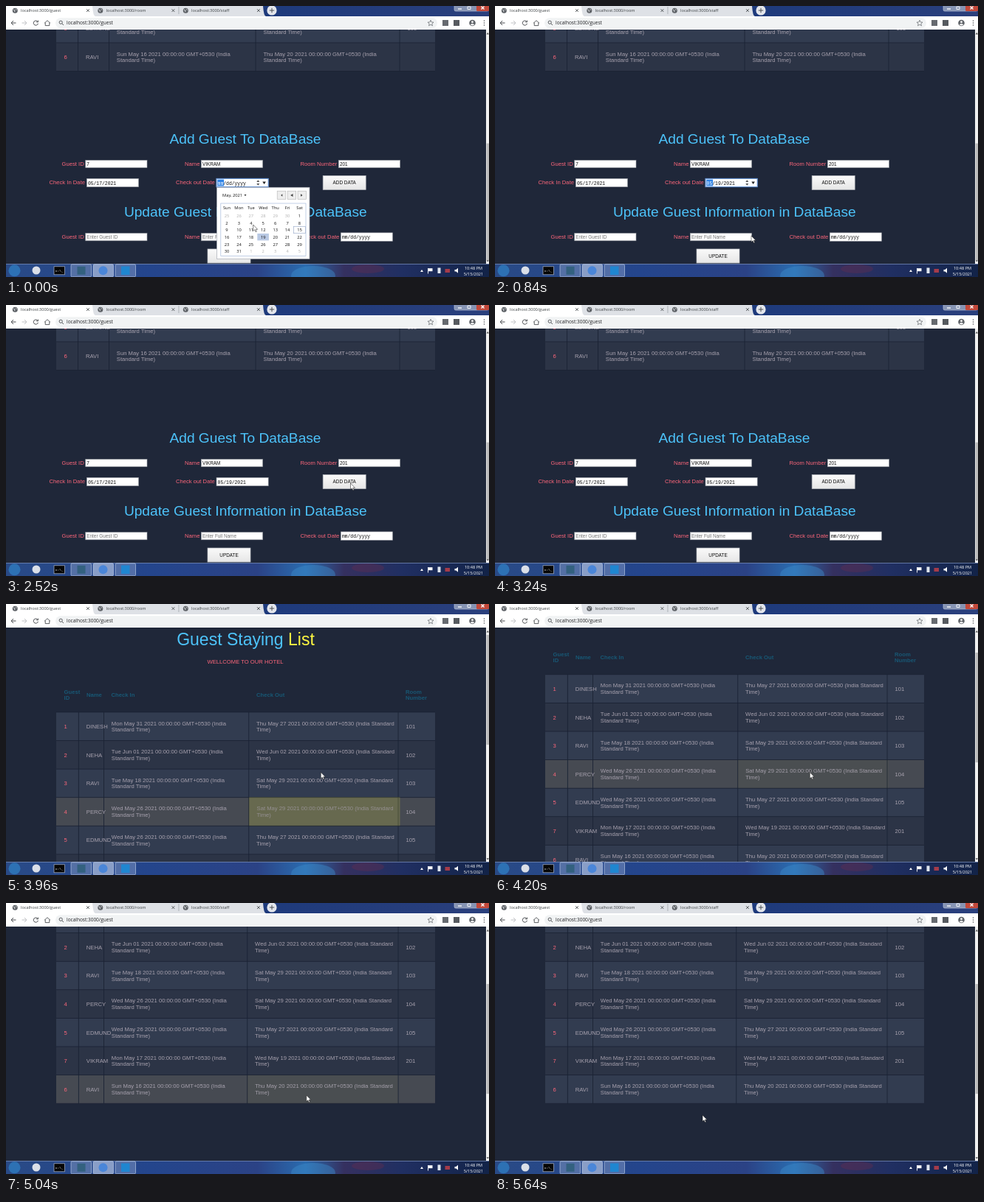
An HTML page for the animation above (5760 ms loop, 654 by 368 pixels).

```html
<!DOCTYPE html>
<html lang="en">
<head>
<meta charset="utf-8">
<title>Guest list</title>
<style>
html, body { margin: 0; width: 100%; height: 100%; overflow: hidden; background: #1f2739; }
svg { display: block; width: 654px; height: 368px; }
text { font-family: "Liberation Sans", Arial, sans-serif; white-space: pre; }
.ui { font-family: "Open Sans", "Noto Sans", sans-serif; }
.mono { font-family: "Liberation Mono", "Noto Sans Mono", monospace; }
</style>
</head>
<body>
<svg id="stage" viewBox="0 0 654 368">
  <defs>
    <clipPath id="view"><rect y="32" width="650" height="318"/></clipPath>
    <linearGradient id="bar">
      <stop offset="0" stop-color="#294a86"/><stop offset=".3" stop-color="#24458c"/>
      <stop offset=".52" stop-color="#2b4285"/><stop offset=".62" stop-color="#2a6cb0"/>
      <stop offset=".7" stop-color="#35305f"/><stop offset=".82" stop-color="#202f62"/>
      <stop offset="1" stop-color="#122348"/>
    </linearGradient>
    <linearGradient id="glass">
      <stop offset="0" stop-color="#2c4f95"/><stop offset=".5" stop-color="#1d3a7c"/>
      <stop offset="1" stop-color="#2a3f7c"/>
    </linearGradient>
    <linearGradient id="btn" x2="0" y2="1">
      <stop offset="0" stop-color="#fafafa"/><stop offset="1" stop-color="#e6e6e6"/>
    </linearGradient>
  </defs>
</svg>
<script>
const LOOP = 5760, STEP = 120, ROW = 38.6, TOP = 147, FORM_SCROLL = 290;
const BODY = 7.66, SMALL = 6.38;
const PINK = '#fb667a', SKY = '#4dc3fa', GREY = '#a7a1ae';
const stage = document.getElementById('stage');

function el(parent, tag, attrs = {}) {
  const node = document.createElementNS('http://www.w3.org/2000/svg', tag);
  for (const key in attrs) node.setAttribute(key, attrs[key]);
  parent.append(node);
  return node;
}
const group = (p, attrs) => el(p, 'g', attrs);
const rect = (p, x, y, width, height, fill, more) => el(p, 'rect', { x, y, width, height, fill, ...more });
const circle = (p, cx, cy, r, fill, more) => el(p, 'circle', { cx, cy, r, fill, ...more });
const line = (p, d, stroke, width = 0.8, more) =>
  el(p, 'path', { d, stroke, fill: 'none', 'stroke-width': width, ...more });
const shape = (p, d, fill, more) => el(p, 'path', { d, fill, ...more });
// cy is the middle of the capitals
function text(p, x, cy, str, size, fill, more) {
  const node = el(p, 'text', { x, y: cy + size * 0.36, 'font-size': size, fill, ...more });
  node.textContent = str;
  return node;
}
const MID = { 'text-anchor': 'middle' };
const UI = { class: 'ui' };
const UI_MID = { ...UI, ...MID };
const show = (node, on) => node.setAttribute('visibility', on ? 'inherit' : 'hidden');
const move = (node, x, y) => node.setAttribute('transform', `translate(${x} ${y})`);

const guests = [
  ['1', 'DINESH', 'Mon May 31', 'Thu May 27', '101'],
  ['2', 'NEHA', 'Tue Jun 01', 'Wed Jun 02', '102'],
  ['3', 'RAVI', 'Tue May 18', 'Sat May 29', '103'],
  ['4', 'PERCY', 'Wed May 26', 'Sat May 29', '104'],
  ['5', 'EDMUND', 'Wed May 26', 'Thu May 27', '105'],
  ['7', 'VIKRAM', 'Mon May 17', 'Wed May 19', '201'],
  ['6', 'RAVI', 'Sun May 16', 'Thu May 20', ''],
];
const stamp = day => day + ' 2021 00:00:00 GMT+0530 (India';
const rowFill = i => i % 2 ? '#2c3446' : '#323c50';

function twoLines(p, x, cy, lines) {
  return lines.map((s, i) => text(p, x, cy - 4.5 + i * 8.7, s, BODY, GREY));
}

function table(p, list, cols, wideOut) {
  const [c0, c1, c2, c3, c4, end] = cols;
  const height = list.length * ROW;
  const top = i => TOP + i * ROW;
  const backs = list.map((_, i) => rect(p, c0, top(i), end - c0, ROW, rowFill(i)));
  for (let i = 0; i <= list.length; i++) rect(p, c0, top(i) - 0.5, end - c0, 0.8, '#1a2132');
  for (const x of [c1, c2, c4]) rect(p, x - 0.4, TOP, 0.9, height, '#1b2335');
  const outs = group(p);
  rect(outs, c3 - 0.4, TOP, 0.9, height, '#1b2335');
  const cells = list.map((guest, i) => {
    const [id, name, from, to, room] = guest, cy = top(i) + ROW / 2;
    text(p, c0 + 10.5, cy, id, BODY, PINK);
    text(p, c1 + 10.5, cy, name, BODY, GREY);
    twoLines(p, c2 + 10.3, cy, [stamp(from), 'Standard Time)']);
    text(p, c4 + 10.4, cy, room, BODY, GREY);
    const cell = group(outs);
    const shadow = shape(cell, '', '#7f7c21', { opacity: 0 });
    const fill = rect(cell, c3, top(i), end - 50 - c3, ROW, '#fff842', { opacity: 0 });
    const lines = twoLines(cell, c3 + 10.4, cy, wideOut
      ? [stamp(to) + ' Standard', 'Time)'] : [stamp(to), 'Standard Time)']);
    return { cell, shadow, fill, lines, x: c3, right: end - 50, y: top(i) };
  });
  return { backs, cells, outs };
}

function input(p, x, y, w, h) {
  rect(p, x, y, w, h, '#fff', { stroke: '#8f939b', 'stroke-width': 0.6 });
}
function field(p, x, cy, value, hint) {
  input(p, x, cy - 4.9, 83.3, 10.2);
  text(p, x + 1.6, cy + 0.4, value || hint, SMALL, value ? '#111' : '#757575');
}
function dateField(p, x, cy, value) {
  input(p, x, cy - 5.6, 70.2, 11.4);
  return text(p, x + 1.6, cy + 0.4, value || 'mm/dd/yyyy', SMALL, '#111', { class: 'mono' });
}
function button(p, x, y, label) {
  rect(p, x, y, 58, 19, 'url(#btn)', { stroke: '#b9bcc2', 'stroke-width': 0.7 });
  text(p, x + 29, y + 9.7, label, SMALL, '#111', MID);
}

function forms(p, filled) {
  const put = s => filled ? s : '';
  const label = (x, cy, s) => text(p, x, cy, s, BODY, PINK);
  text(p, 324, 180.3, 'Add Guest To DataBase', 19.15, SKY, MID);
  label(75.5, 214, 'Guest ID');
  field(p, 107.7, 214.3, put('7'), 'Enter Guest ID');
  label(242, 214, 'Name');
  field(p, 264.3, 214.3, put('VIKRAM'), 'Enter Full Name');
  label(398.5, 214, 'Room Number');
  field(p, 450.3, 214.3, put('201'), 'Enter Room');
  label(58.5, 239.7, 'Check In Date');
  dateField(p, 109.3, 239.9, put('05/17/2021'));
  label(230, 239.7, 'Check out Date');
  const out = dateField(p, 285, 239.9, '');
  button(p, 429.2, 230.5, 'ADD DATA');
  text(p, 324.3, 279.2, 'Update Guest Information in DataBase', 19.15, SKY, MID);
  label(75.5, 313.2, 'Guest ID');
  field(p, 107.7, 313.5, '', 'Enter Guest ID');
  label(242, 313.2, 'Name');
  field(p, 264.3, 313.5, '', 'Enter Full Name');
  label(398.5, 313.2, 'Check out Date');
  dateField(p, 453.3, 313.5, '');
  button(p, 273, 330, 'UPDATE');
  return out;
}

function heading(p) {
  const title = text(p, 324.5, 47.3, 'Guest Staying ', 23, SKY, MID);
  const last = el(title, 'tspan', { fill: '#fff842' });
  last.textContent = 'List';
  text(p, 324, 78.3, 'WELLCOME TO OUR HOTEL', BODY, PINK, MID);
  const th = (x, cy, s) => text(p, x, cy, s, BODY, '#185875', { 'font-weight': 'bold' });
  th(78.5, 119, 'Guest'); th(78.5, 127.2, 'ID');
  th(109, 123, 'Name');
  th(142.5, 123, 'Check In');
  th(339, 123, 'Check Out');
  th(541, 119, 'Room'); th(541, 127.2, 'Number');
}

function calendar(p) {
  rect(p, 285.5, 246.3, 125.5, 97, '#fff', { stroke: '#a9adb5', 'stroke-width': 0.7 });
  text(p, 293, 257, 'May, 2021', 5.75, '#111', UI);
  shape(p, 'M322.5 256h3l-1.5 2z', '#222');
  ['M374.3 255.2v3.6l-2.2-1.8z', 'M388.5 255l-3.4 2 3.4 2z', 'M399 255.2v3.6l2.6-1.8z'].forEach((d, i) => {
    rect(p, 367.2 + i * 13.9, 251.2, 11.6, 11.2, '#eee', { stroke: '#b5b5b5', 'stroke-width': 0.6 });
    shape(p, d, '#444');
  });
  rect(p, 290.8, 268, 115.2, 71.6, '#fff', { stroke: '#a8bcdc', 'stroke-width': 0.7 });
  rect(p, 340.3, 309, 15.6, 9.4, '#b9c9e4');
  rect(p, 389.6, 299.3, 15.8, 9.4, 'none', { stroke: '#9fb0cc', 'stroke-width': 0.7 });
  const colX = i => 299 + i * 16.42;
  'Sun Mon Tue Wed Thu Fri Sat'.split(' ').forEach((d, i) => text(p, colX(i), 273.6, d, 5.75, '#111', UI_MID));
  for (let i = 0; i < 42; i++) {
    const n = i - 5, inside = n > 0 && n < 32;
    const day = n < 1 ? n + 30 : n > 31 ? n - 31 : n;
    text(p, colX(i % 7), 285 + Math.floor(i / 7) * 9.62, day, 5.75, inside ? '#111' : '#b0b0b0', UI_MID);
  }
}

function browser(p) {
  rect(p, 0, 0, 654, 14, 'url(#glass)');
  shape(p, 'M117 0H348Q349 14 352 14H117z', '#dee1e6');
  shape(p, 'M0 0H117Q118 14 121 14H0z', '#fff');
  rect(p, 233.6, 1, 0.7, 10, '#9a9da3');
  ['guest', 'room', 'staff'].forEach((page, i) => {
    const x = 12.3 + i * 115.5;
    circle(p, x, 6.2, 3.5, '#5f6368');
    line(p, `M${x - 2.4} 5l2.2 1 -.6 2M${x + 0.6} 4l1.6 1.6`, '#e8eaed', 0.9);
    text(p, x + 7.8, 6, 'localhost:3000/' + page, 5.6, '#3c4043', UI);
    line(p, `M${x + 96.7} 4.2l3.8 3.8m0 -3.8l-3.8 3.8`, '#3c4043', 0.8);
  });
  circle(p, 360, 6, 6.6, '#e3e6ec');
  line(p, 'M360 2.8v6.4M356.8 6h6.4', '#3c4043', 0.9);
  rect(p, 607, -2, 46.5, 9, '#8694b4', { rx: 2, stroke: '#c3cbdd', 'stroke-width': 0.6 });
  rect(p, 637, -2, 17, 9, '#c2483a', { rx: 1.5 });
  line(p, 'M612 4h5', '#fff', 1.3);
  line(p, 'M625 1h4v3.5h-4z', '#fff', 0.9);
  line(p, 'M643.5 .5l4 4m0 -4l-4 4', '#fff', 1.2);

  rect(p, 0, 14, 654, 18, '#fff');
  rect(p, 67, 16.2, 517, 13.8, '#f1f3f4', { rx: 6.9 });
  line(p, 'M13.5 23h-6.5m3 -3l-3 3 3 3', '#4a4d51', 1);
  line(p, 'M21.5 23h6.5m-3 -3l3 3-3 3', '#c0c2c5', 1);
  line(p, 'M43 21.4a3.1 3.1 0 1 0 .4 2.4M43.4 19.6v2.2h-2.2', '#4a4d51', 1);
  line(p, 'M52 23.4l4-3.7 4 3.7M53.2 22.6v4h5.6v-4', '#4a4d51', 0.9);
  circle(p, 74.2, 22.2, 2.1, 'none', { stroke: '#4a4d51', 'stroke-width': 0.9 });
  line(p, 'M75.8 23.8l2.2 2.2', '#4a4d51', 0.9);
  text(p, 82, 23, 'localhost:3000/guest', 6.5, '#202124', UI);
  shape(p, 'M575 19.2l1.1 2.7 2.9.2-2.2 1.9.7 2.8-2.5-1.5-2.5 1.5.7-2.8-2.2-1.9 2.9-.2z', 'none',
    { stroke: '#5f6368', 'stroke-width': 0.7 });
  rect(p, 591, 19, 8, 8, '#666a6f');
  rect(p, 606, 19, 8, 8, '#565a5f');
  circle(p, 631.5, 23, 4.3, '#5f6368');
  circle(p, 631.5, 21.7, 1.4, '#fff');
  shape(p, 'M628.8 25.4q2.7-2.6 5.4 0q-2.7 2-5.4 0z', '#fff');
  for (const y of [20, 23, 26]) circle(p, 647.5, y, 0.75, '#4a4d51');
}

function taskbar(p) {
  rect(p, 0, 350, 654, 18, 'url(#bar)');
  el(p, 'ellipse', { cx: 416, cy: 366, rx: 30, ry: 13, fill: '#3d8ac8', opacity: 0.45 });
  el(p, 'ellipse', { cx: 490, cy: 357, rx: 22, ry: 6, fill: '#6b2b4c', opacity: 0.35 });
  rect(p, 0, 368, 654, 4, '#000');
  rect(p, 0, 350, 654, 0.8, '#7288b4');
  [[88, 0.25], [118, 0.55], [148, 0.25]].forEach(([x, a]) =>
    rect(p, x, 350.8, 27.5, 17, '#dbe6fa', { rx: 1.5, 'fill-opacity': a, stroke: '#c8d6ee', 'stroke-width': 0.6 }));
  circle(p, 11.5, 359.3, 8, '#2d71b4');
  circle(p, 41, 359, 5.5, '#dadfe8');
  rect(p, 65, 353.8, 14.5, 11, '#050505', { stroke: '#aeb6c4', 'stroke-width': 0.7 });
  text(p, 67, 359, 'C:\\_', 4.4, '#fff', { class: 'mono' });
  rect(p, 96.5, 353.8, 11, 11, '#33617f');
  circle(p, 131.5, 359.2, 6, '#4a86d8');
  rect(p, 156, 353.5, 11.5, 11.5, '#1f86d0');
  shape(p, 'M561 361l2-3 2 3z', '#fff');
  line(p, 'M571.5 356v7.5', '#fff', 0.9);
  shape(p, 'M572 356.2h5.5v4h-5.5z', '#fff');
  rect(p, 584.5, 355.5, 4, 7.5, '#dfe5ee');
  rect(p, 594.5, 357, 6.5, 5, '#a43b4a');
  shape(p, 'M607.5 358h2l2.5-2.3v7l-2.5-2.3h-2z', '#fff');
  text(p, 633, 355.8, '10:48 PM', 5.6, '#fff', UI_MID);
  text(p, 633, 364, '5/15/2021', 5.6, '#fff', UI_MID);
}

// Scene
rect(stage, 0, 0, 654, 368, '#1f2739');
const view = group(stage, { 'clip-path': 'url(#view)' });

const before = group(view);
const beforePage = group(before, { transform: `translate(0 ${-FORM_SCROLL})` });
table(beforePage, guests.filter(g => g[0] !== '7'), [68, 97.5, 139.5, 338, 533, 581], false);
const checkOut = forms(before, true);
const focus = group(before);
rect(focus, 285, 234.3, 70.2, 11.4, 'none', { stroke: '#5b93e0', 'stroke-width': 0.9 });
rect(focus, 286.3, 235.6, 8.8, 8.8, '#2f83e6');
const month = text(focus, 286.6, 240.3, 'mm', SMALL, '#fff', { class: 'mono' });
shape(focus, 'M339.3 238.9h4l-2-2.7zM339.3 241h4l-2 2.7z', '#555');
shape(focus, 'M347.3 238.4h4.6l-2.3 3.6z', '#222');

const after = group(view);
heading(after);
const list = table(after, guests, [68, 98.3, 132.5, 326.7, 531, 581], true);
forms(group(after, { transform: `translate(0 ${FORM_SCROLL + ROW})` }), false);

rect(stage, 650, 32, 4, 318, '#f1f1f1');
shape(stage, 'M650.6 38.5h3.4l-1.7-2.4zM650.6 345.2h3.4l-1.7 2.4z', '#505050');
const thumb = rect(stage, 650.6, 42, 3.4, 146, '#bcbcbc');
browser(stage);
taskbar(stage);
const popup = group(stage);
calendar(popup);
const cursor = shape(stage, 'M0 0V8.6L2 6.8 3.4 9.8 4.7 9.2 3.4 6.3H6z', '#fff', { stroke: '#111', 'stroke-width': 0.5 });

// Motion
const PICK = 720, SUBMIT = 2040, HIDE = 2640, RELOAD = 3480, SETTLE = 5030;
const pointer = [
  [0, 334.7, 297], [480, 346, 311], [840, 347, 312], [1560, 466.5, 242],
  [RELOAD - 1, 466.5, 242], [RELOAD, 426.3, 228.5], [4900, 426.3, 228.5],
  [5040, 406.8, 261], [5400, 300, 285], [5520, 281, 288],
];
const scrollTrack = [[RELOAD, FORM_SCROLL], [3900, 0], [4080, 0], [4420, 144.9]];
const hovers = [[0, -1], [3890, 3], [4070, 2], [4190, 3], [4430, 4], [4520, 5], [SETTLE, 6], [5180, -1]];

function at(track, t) {
  const i = track.findIndex(k => k[0] > t);
  if (i < 0) return track.at(-1).slice(1);
  if (i === 0) return track[0].slice(1);
  const a = track[i - 1], b = track[i], k = (t - a[0]) / (b[0] - a[0]);
  return a.slice(1).map((v, n) => v + (b[n + 1] - v) * k);
}
const mix = (a, b, k) => `rgb(${a.map((v, i) => Math.round(v + (b[i] - v) * k))})`;

function liftCell(c, k) {
  const d = 2.87 * k, { x, right, y } = c, bottom = y + ROW;
  move(c.cell, d, -d);
  c.fill.setAttribute('opacity', k);
  c.shadow.setAttribute('opacity', k);
  c.shadow.setAttribute('d', `M${x} ${y}l${-d} ${d}V${bottom + d}H${right - d}l${d} ${-d}H${x}z`);
  const ink = mix([167, 161, 174], [64, 62, 16], k);
  c.lines.forEach(l => l.setAttribute('fill', ink));
}

function draw(t) {
  const reloaded = t >= RELOAD, picked = t >= PICK;
  show(before, !reloaded);
  show(after, reloaded);
  show(popup, !picked);
  show(focus, !reloaded && t < SUBMIT);
  checkOut.textContent = picked ? '05/19/2021' : 'mm/dd/yyyy';
  month.textContent = picked ? '05' : 'mm';

  const [y] = at(scrollTrack, t);
  move(after, 0, -y);
  const perPage = 303 / (reloaded ? 646 : 608);
  thumb.setAttribute('y', 42 + y * perPage);
  thumb.setAttribute('height', 318 * perPage);

  const [since, row] = hovers.findLast(h => h[0] <= t);
  const k = Math.min(1, (t - since) / 400);
  list.backs.forEach((b, i) => b.setAttribute('fill', i === row ? '#464a52' : rowFill(i)));
  list.cells.forEach((c, i) => liftCell(c, i === row ? k : 0));
  move(list.outs, t < SETTLE ? 2 : 0, 0);

  move(cursor, ...at(pointer, t));
  show(cursor, t < HIDE || reloaded);
}

const start = performance.now();
function tick() {
  const t = (performance.now() - start) % LOOP;
  draw(Math.floor(t / STEP) * STEP);
  requestAnimationFrame(tick);
}
tick();
</script>
</body>
</html>
```
